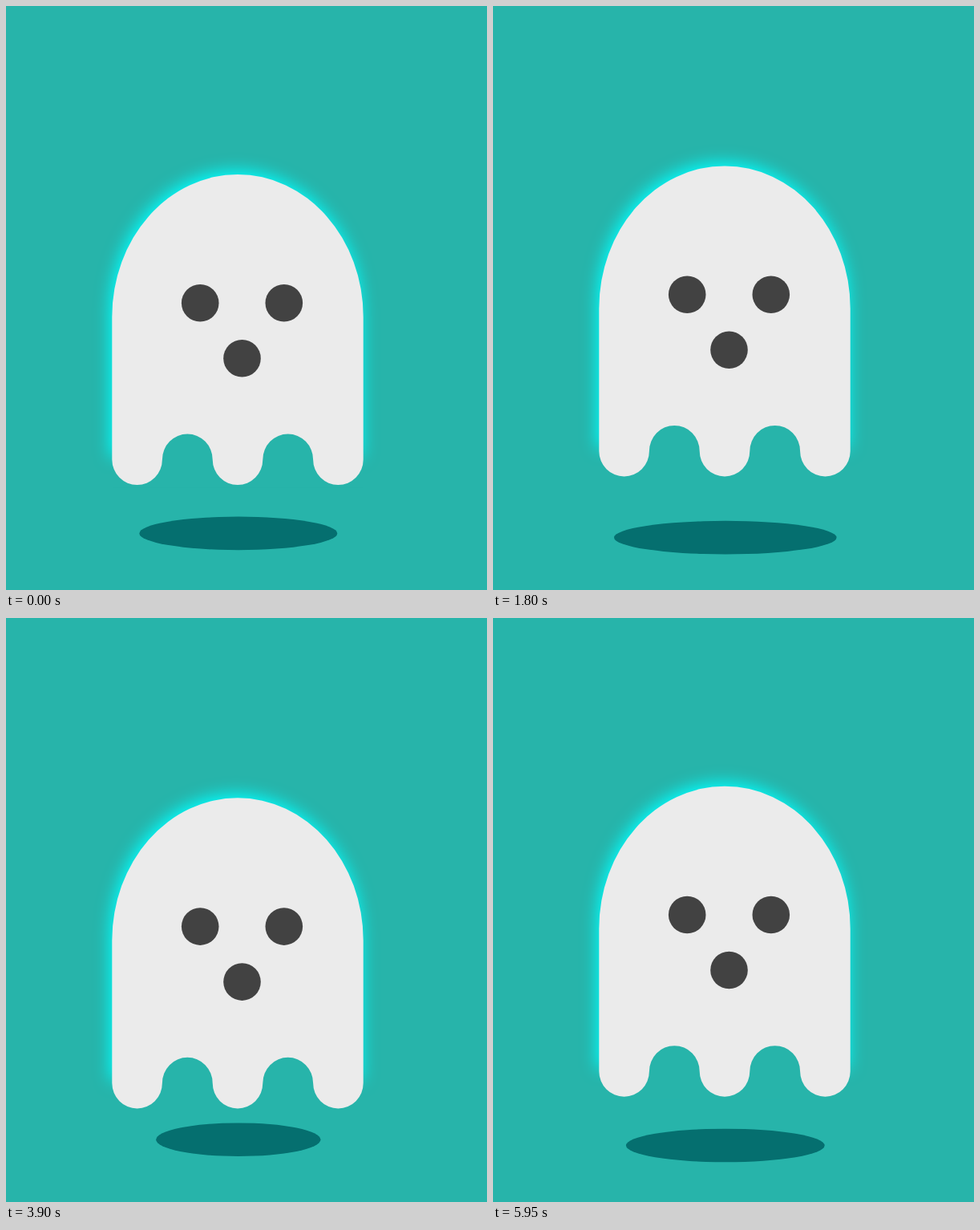
Animation of 600x728 px, one loop 6 s. Source, as an HTML page:

```html
<!DOCTYPE html>
<html lang="en">
<head>
<meta charset="utf-8">
<title>Floating ghost</title>
<style>
  html, body { margin: 0; width: 100%; height: 100%; overflow: hidden; background: #27b4aa; }
  svg { display: block; width: 600px; height: 728px; }
</style>
</head>
<body>
<svg viewBox="0 0 600 728">
  <defs>
    <filter id="blur" x="-20%" y="-20%" width="140%" height="140%" color-interpolation-filters="sRGB">
      <feGaussianBlur stdDeviation="10"/>
    </filter>
  </defs>
  <ellipse id="shadow" cx="289.8" cy="657.5" rx="124" ry="20.8" fill="#056f6f"/>
  <g id="ghost">
    <path d="M132.3 565V387a156.7 177.5 0 0 1 313.4 0V565Z"
      transform="translate(-2 -4)" fill="#0ff" filter="url(#blur)"/>
    <!-- hides the glow between the legs -->
    <path d="M133 520h312v80h-312Z" fill="#27b4aa"/>
    <path fill="#ebebeb" d="M132.3 565V387a156.7 177.5 0 0 1 313.4 0V565
      a31.3 31.6 0 0 1 -62.6 0a31.4 32 0 0 0 -62.8 0a31.3 31.6 0 0 1 -62.6 0
      a31.4 32 0 0 0 -62.8 0a31.3 31.6 0 0 1 -62.6 0Z"/>
    <g fill="#424242">
      <circle cx="242.2" cy="369.8" r="23.3"/>
      <circle cx="346.8" cy="369.8" r="23.3"/>
      <circle cx="294.5" cy="438.8" r="23.3"/>
    </g>
  </g>
</svg>
<script>
  const PERIOD = 3000;
  const easeIn = x => 1 - Math.cos(x * Math.PI / 2);
  const easeOut = x => Math.sin(x * Math.PI / 2);
  const easeInOut = x => (1 - Math.cos(x * Math.PI)) / 2;

  // Each move ends at a time in ms and a height in px
  const moves = [
    { end: 700, y: 16, ease: easeOut },
    { end: 1500, y: -5, ease: easeIn },
    { end: 2280, y: -22, ease: easeInOut },
    { end: PERIOD, y: 0, ease: easeInOut }
  ];
  const ghost = document.getElementById('ghost');
  const shadow = document.getElementById('shadow');

  function offset(t) {
    let from = { end: 0, y: 0 };
    for (const to of moves) {
      if (t < to.end) {
        const x = (t - from.end) / (to.end - from.end);
        return from.y + (to.y - from.y) * to.ease(x);
      }
      from = to;
    }
    return 0;
  }

  function draw() {
    const y = offset(performance.now() % PERIOD);
    ghost.setAttribute('transform', `translate(0 ${y + 0.4})`);
    shadow.setAttribute('rx', 123.5 - 1.45 * y);
    shadow.setAttribute('cy', 657.4 - 0.5 * y);
    requestAnimationFrame(draw);
  }
  draw();
</script>
</body>
</html>
```
